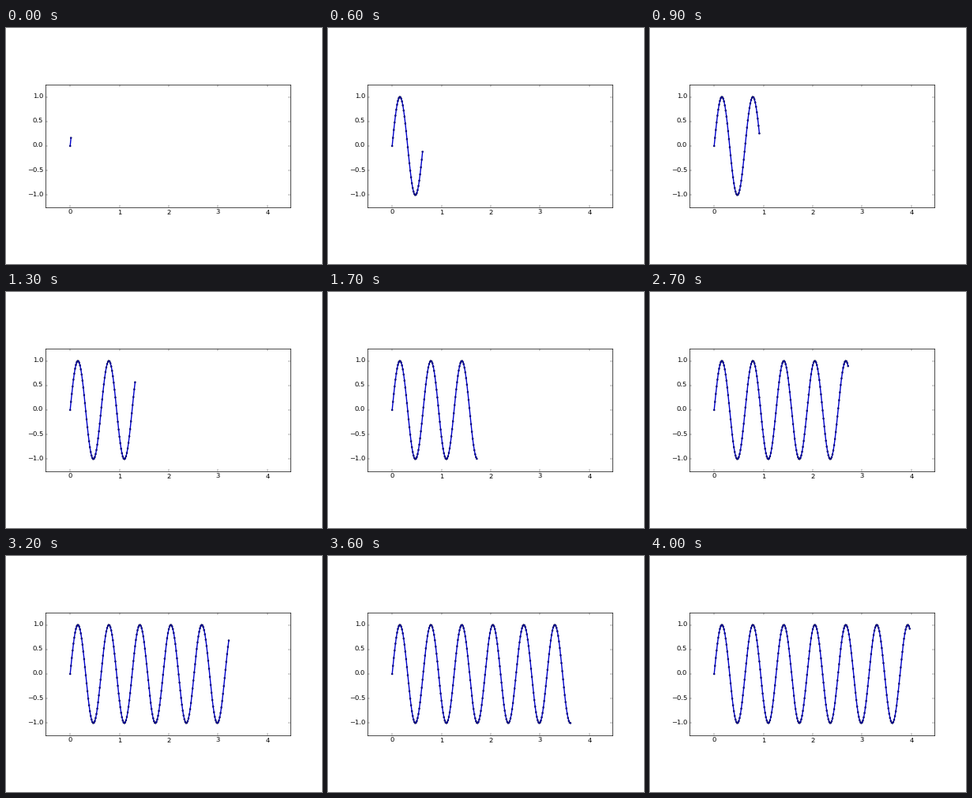
Recreate the animation shown at these times as a matplotlib script. Size 400 px wide and 300 px high, loop 4100 ms.

```python
import numpy as np
import matplotlib.pyplot as plt
from matplotlib.animation import FuncAnimation
from matplotlib.patheffects import Normal

FRAMES = 41
INTERVAL = 100
STEP = 1 / 60
POINTS_PER_FRAME = 6

plt.style.use("classic")
plt.rcParams.update({
    "font.family": "DejaVu Sans",
    "font.size": 12,
    "text.hinting": "none",
    "savefig.dpi": "figure",
    "savefig.facecolor": "white",
})

x = np.arange(239) * STEP
y = np.sin(10 * x)

fig = plt.figure(figsize=(8, 6), dpi=50, facecolor="white")
ax = fig.add_axes([0.125, 0.1, 0.775, 0.8])
ax.set_aspect("equal", adjustable="box")
ax.set_xlim(-0.5, x[-1] + 0.5)
ax.set_ylim(-1.25, 1.25)
ax.set_xticks(range(5))
ax.set_yticks(np.arange(-1, 1.1, 0.5))

# The path effect keeps markers at subpixel positions.
trace, = ax.plot([], [], ".-", color="mediumblue", lw=2, markersize=6,
                 markeredgecolor="black", markeredgewidth=0.5,
                 path_effects=[Normal()])


def update(frame):
    # Slicing stops at the last sample, so the final step is shorter.
    count = 2 + POINTS_PER_FRAME * frame
    trace.set_data(x[:count], y[:count])
    return trace,


anim = FuncAnimation(fig, update, frames=FRAMES, interval=INTERVAL,
                     init_func=lambda: update(0), repeat=True,
                     repeat_delay=0, blit=False)
plt.show()
```
